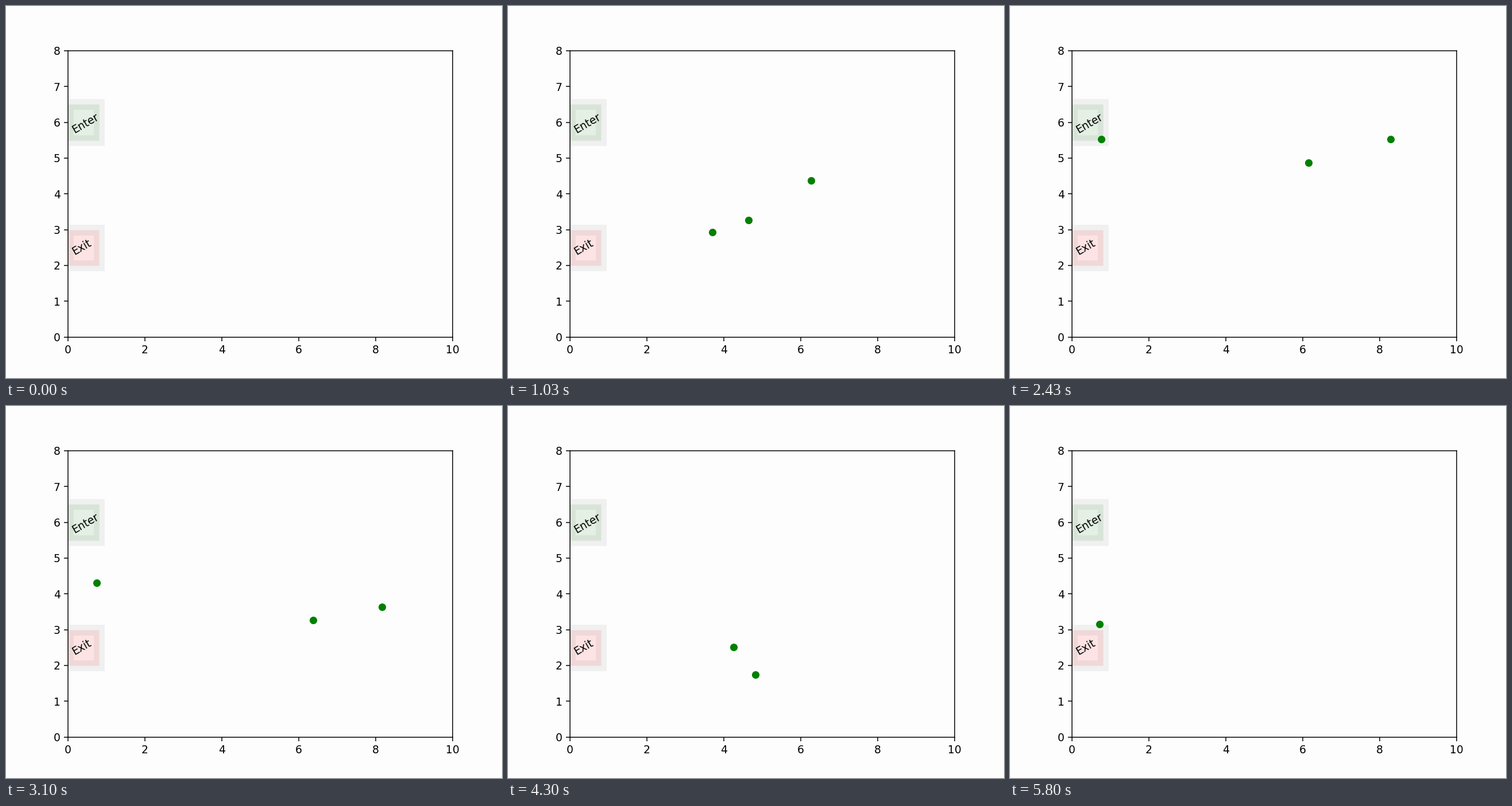
These frames come from a looping animation (864 by 648 pixels, 5.83 s). A matplotlib script:

```python
import matplotlib.pyplot as plt
import numpy as np
from matplotlib.animation import FuncAnimation
from matplotlib.patches import Rectangle

LOOP_MS = 5830
FRAMES = 175
PAPER = "#fdfdfd"

# Every visitor walks in at ENTER, reaches a stop at each beat and leaves at EXIT
ENTER, EXIT = 0.76 + 5.53j, 0.72 + 3.15j
BEATS = [1, 14, 47, 72, 113, 144, 174]
VISITS = [
    [4.13 + 3.21j, 8.56 + 5.62j, 8.29 + 5.52j, 8.04 + 1.83j],
    [2.91 + 3.75j, 6.48 + 2.75j, 6.16 + 4.87j, 6.58 + 1.74j, 3.18 + 1.74j],
    [2.0 + 3.15j, 5.52 + 2.68j, ENTER],
]

plt.rcParams["font.family"] = "DejaVu Sans"
fig, ax = plt.subplots(figsize=(6.4, 4.8), dpi=135, facecolor=PAPER)
ax.set(xlim=(0, 10), ylim=(0, 8), facecolor=PAPER)


def add_gate(y, color, label, label_y):
    ax.add_patch(Rectangle((0, y), 0.8, 1, facecolor=color, edgecolor="gray",
                           linewidth=10, alpha=0.1))
    ax.text(0.05, label_y, label, rotation=30)


add_gate(5.5, "green", "Enter", 5.7)
add_gate(2.0, "red", "Exit", 2.3)
dots, = ax.plot([], [], "o", color="green")


def position(stops, step):
    """Place on the walk as x + yj, not a number outside the visit."""
    path = [ENTER, *stops, EXIT]
    return np.interp(step, BEATS[:len(path)], path, left=np.nan, right=np.nan)


def update(step):
    spots = np.array([position(stops, step) for stops in VISITS])
    dots.set_data(spots.real, spots.imag)
    return dots,


anim = FuncAnimation(fig, update, frames=FRAMES, interval=LOOP_MS / FRAMES,
                     repeat=True, repeat_delay=0)
plt.show()
```
